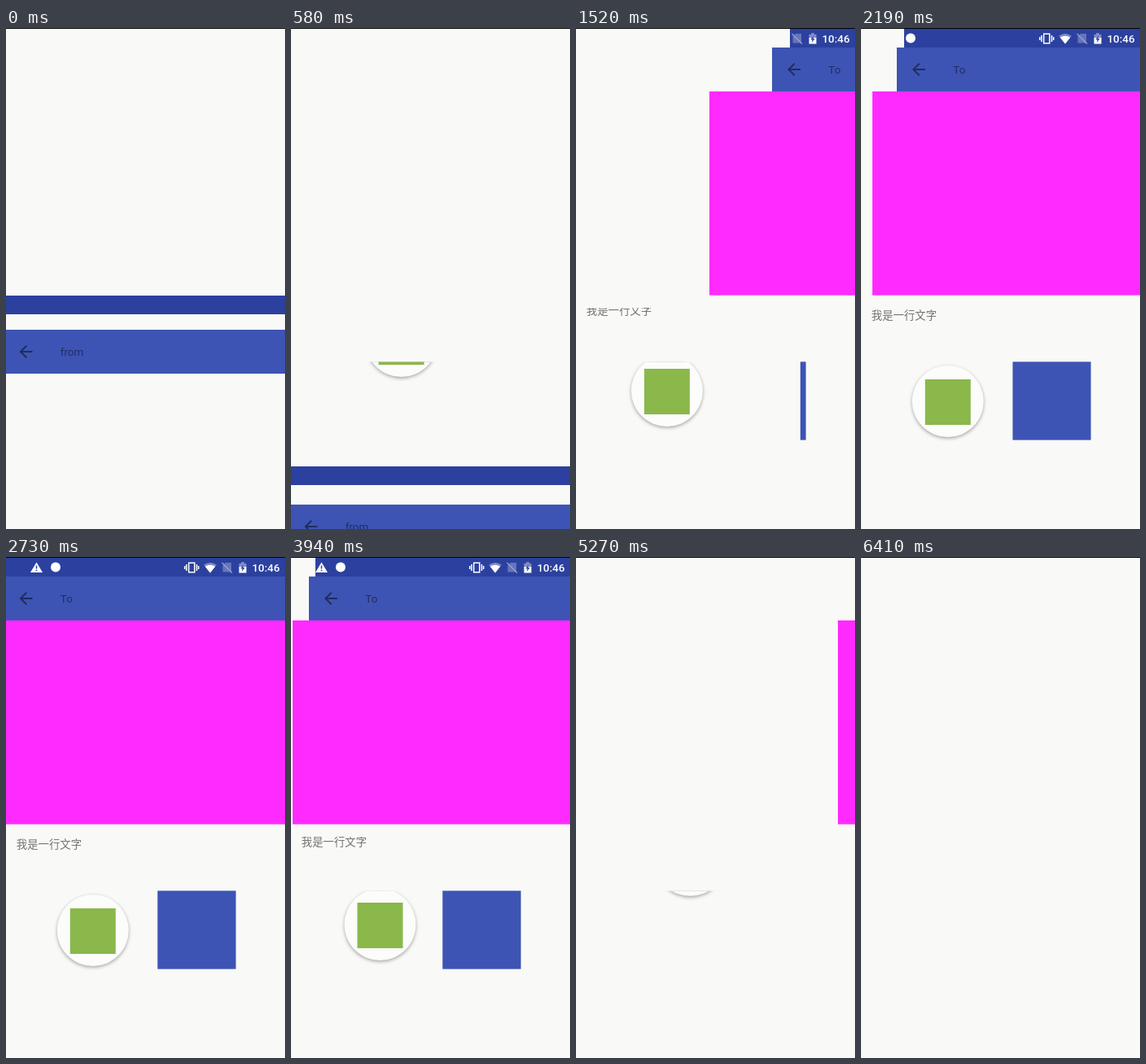
An HTML page with a canvas that plays this animation: 343 by 616 pixels, repeating every 8 s.

```html
<!DOCTYPE html>
<html lang="zh-CN">
<head>
<meta charset="utf-8">
<style>
html, body { margin: 0; width: 100%; height: 100%; overflow: hidden; background: #f9f9f7; }
canvas { display: block; width: 343px; height: 616px; }
</style>
</head>
<body>
<canvas id="stage"></canvas>
<script>
const W = 343, H = 616, LOOP = 8000;
const TICK = 135, PHASE = 25; // the screen refreshes in even ticks
const INK = 'rgba(0,0,0,.47)', BLUE = '#3d54b4', NAVY = '#2c419f';
const ROBOTO = '13.4px Roboto, sans-serif';
const HAN = '13.4px "Noto Sans CJK SC", "Noto Sans CJK", sans-serif';

const canvas = document.getElementById('stage');
const ctx = canvas.getContext('2d');
const ratio = window.devicePixelRatio || 1;
canvas.width = Math.round(W * ratio);
canvas.height = Math.round(H * ratio);

// Distance from rest: decelerates until `end`, accelerates away after `start`
const slide = (gainIn, end, gainOut, start) => t =>
  (gainIn * Math.max(0, end - t)) ** 2 + (gainOut * Math.max(0, t - start)) ** 2;

const statusShift = slide(.01324, 2735, .01291, 3516);
const barShift = slide(.01317, 2688, .01301, 3580);
const panelShift = slide(.01341, 2464, .01347, 3823);
const boxShift = slide(.0134, 2216, .0134, 4064);
const iconShift = slide(.00528, 2193, .00546, 3455);

function rect(color, x, y, w, h) {
  if (w <= 0 || h <= 0) return;
  ctx.fillStyle = color;
  ctx.fillRect(x, y, w, h);
}

function disc(color, x, y, r) {
  ctx.fillStyle = color;
  ctx.beginPath();
  ctx.arc(x, y, r, 0, Math.PI * 2);
  ctx.fill();
}

function label(text, x, y, font, color) {
  ctx.font = font;
  ctx.fillStyle = color;
  ctx.fillText(text, x, y);
}

function shape(d, fill, stroke, x = 0, y = 0, width = 1.5) {
  const path = new Path2D(d);
  ctx.save();
  ctx.translate(x, y);
  if (fill) { ctx.fillStyle = fill; ctx.fill(path); }
  if (stroke) { ctx.strokeStyle = stroke; ctx.lineWidth = width; ctx.stroke(path); }
  ctx.restore();
}

function clipped(x, y, w, h, draw) {
  if (w <= 0 || h <= 0) return;
  ctx.save();
  ctx.beginPath();
  ctx.rect(x, y, w, h);
  ctx.clip();
  draw();
  ctx.restore();
}

function toolbar(x, y, title) {
  rect(BLUE, x, y, W - x, 54);
  const inset = x + Math.min(x, 2.5);
  shape('M20 11H7.83l5.59-5.59L12 4l-8 8 8 8 1.41-1.41L7.83 13H20v-2z', INK, null, inset + 12.5, y + 15);
  label(title, inset + 66.8, y + 32, ROBOTO, INK);
}

function statusBar(x) {
  clipped(x, 1, W - x, 23, () => {
    rect(NAVY, x, 1, W - x, 23);
    // warning and notification
    shape('M37.5 6.5L45 19H30Z', '#fff');
    shape('M37.5 10.5V14.5M37.5 15.7V17.3', null, NAVY);
    disc('#fff', 61, 12.5, 6);
    // vibrate
    shape('M224.7 7.2H231.8V18.8H224.7Z', null, '#fff');
    shape('M222 9V17M219.8 11V15M234.5 9V17M236.7 11V15', null, '#fff');
    // wifi
    shape('M251 19.5L243.2 9.8Q251 4 258.8 9.8Z', 'rgba(255,255,255,.4)');
    shape('M251 19.5L244.8 11.8Q251 7.5 257.2 11.8Z', '#fff');
    // no sim
    shape('M270 7H277V18.5H266.5V10.5Z', 'rgba(255,255,255,.28)');
    shape('M265.5 7L278 19.5', null, '#98a3d2', 0, 0, 1.2);
    // battery
    shape('M286.5 8H289V6.3H293V8H295.5V12H286.5Z', 'rgba(255,255,255,.4)');
    shape('M286.5 12H295.5V19.5H286.5Z', '#fff');
    shape('M292 9.5L288.3 14.3H290.6L289.8 18L293.7 13H291.4Z', NAVY);
    label('10:46', 302.5, 17.7, '500 ' + ROBOTO, '#fff');
  });
}

function launcher(x, y) {
  clipped(0, 410.4, W, 110, () => {
    ctx.save();
    ctx.shadowColor = 'rgba(0,0,0,.34)';
    ctx.shadowBlur = 4 * ratio;
    ctx.shadowOffsetY = 1.6 * ratio;
    disc('#fcfcfb', x, y, 44);
    ctx.restore();
    rect('#8ab84b', x - 28, y - 27, 56, 56);
  });
}

function draw(t) {
  ctx.setTransform(ratio, 0, 0, ratio, 0, 0);
  rect('#f9f9f7', 0, 0, W, H);

  // the old page falls away
  const fall = t - PHASE;
  rect(NAVY, 0, Math.round(329 + fall * .389), W, 23);
  toolbar(0, Math.round(371 + fall * .398), 'from');

  // the new page gathers, rests and scatters
  const lift = iconShift(t), panelX = Math.round(panelShift(t)), boxX = 186.3 + boxShift(t);
  toolbar(Math.round(barShift(t)), 24, 'To');
  statusBar(Math.round(statusShift(t)));
  rect('#ff2aff', panelX, 78, W - panelX, 250.6);
  clipped(0, 344, W, 20, () => label('我是一行文字', 12.8, 357.8 - lift * .42, HAN, '#737373'));
  launcher(106.8 + lift * .39, 459 - lift);
  rect(BLUE, boxX, 410.4, 282.6 - boxX, 96.2);

  rect('#000', 0, 0, W, 1);
}

function drawPointer() {
  shape('M.5.5V16.5L4.3 13 7 18.5 9.2 17.6 6.8 12H11.5Z', '#fff', '#000', 11, 577, 1);
}

const start = performance.now();
function frame() {
  const now = (performance.now() - start) % LOOP;
  const tick = Math.max(0, Math.floor((now - PHASE) / TICK));
  draw(PHASE + tick * TICK);
  if (now >= 6260 && now < 6410) drawPointer();
  requestAnimationFrame(frame);
}
frame();
</script>
</body>
</html>
```
